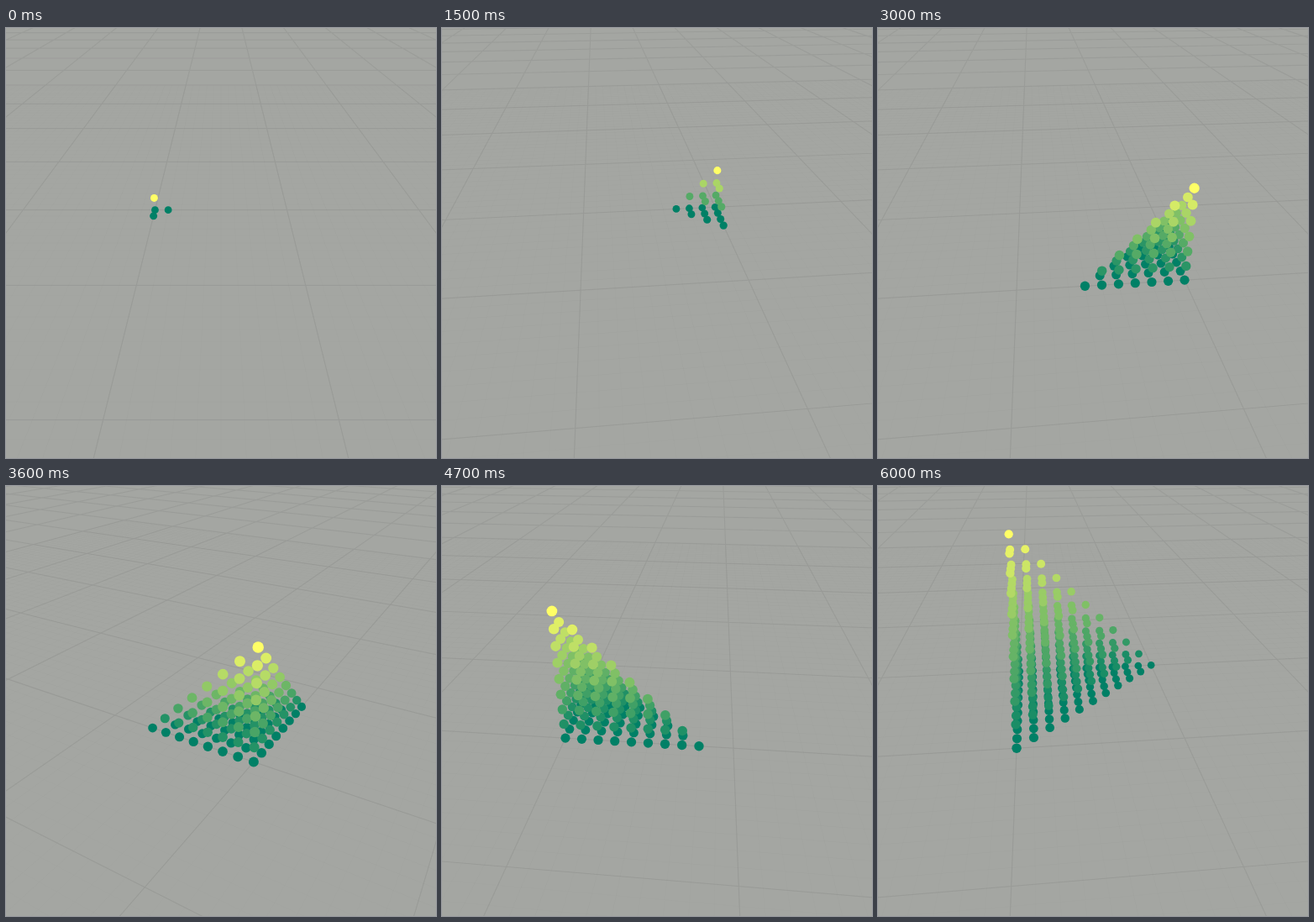
Write an HTML page with a canvas that moves like this. It is 512 px wide and 512 px high and loops after 6.1 s.

```html
<!DOCTYPE html>
<html lang="en">
<head>
<meta charset="utf-8">
<title>Tetrahedral numbers</title>
<style>
html, body { margin: 0; width: 100%; height: 100%; overflow: hidden; background: #a4a6a2; }
canvas { display: block; width: 512px; height: 512px; }
</style>
</head>
<body>
<canvas id="stage" width="512" height="512"></canvas>
<script>
const ctx = document.getElementById("stage").getContext("2d");
const CENTER = 256;
const FOCAL = CENTER / Math.tan(Math.PI / 8);
const DISTANCE = 35;
const SIN_TILT = 0.5, COS_TILT = Math.sqrt(3) / 2;
const DOT_RADIUS = 0.28;
const NEAR = 2;
const LOOP = 6100, STEP = 100, STEPS = 60;

// World to camera: x right, y up, w depth. The camera orbits the origin.
function toCamera(x, y, z, angle) {
  const c = Math.cos(angle), s = Math.sin(angle);
  const away = y * c - x * s;
  return {
    x: x * c + y * s,
    y: away * SIN_TILT + z * COS_TILT,
    w: DISTANCE + away * COS_TILT - z * SIN_TILT
  };
}

function toScreen(p) {
  const scale = FOCAL / p.w;
  return [CENTER + p.x * scale, CENTER - p.y * scale];
}

function clipNear(p, q) {
  if (p.w >= NEAR) return p;
  const t = (NEAR - p.w) / (q.w - p.w);
  return { x: p.x + (q.x - p.x) * t, y: p.y + (q.y - p.y) * t, w: NEAR };
}

function addLine(a, b) {
  if (a.w < NEAR && b.w < NEAR) return;
  ctx.moveTo(...toScreen(clipNear(a, b)));
  ctx.lineTo(...toScreen(clipNear(b, a)));
}

function drawGrid(extent, spacing, color, width, angle) {
  ctx.beginPath();
  for (let v = -extent; v <= extent; v += spacing) {
    addLine(toCamera(v, -extent, 0, angle), toCamera(v, extent, 0, angle));
    addLine(toCamera(-extent, v, 0, angle), toCamera(extent, v, 0, angle));
  }
  ctx.strokeStyle = color;
  ctx.lineWidth = width;
  ctx.stroke();
}

function drawTetrahedron(size, angle) {
  const dots = [];
  for (let k = 0; k < size; k++) {
    const level = k / (size - 1);
    const color = `rgb(${Math.round(255 * level)},${Math.round(128 + 127 * level)},102)`;
    for (let j = 0; j < size - k; j++) {
      for (let i = 0; i < size - k - j; i++) {
        dots.push({ ...toCamera(i - 5, 5 - j, k, angle), color });
      }
    }
  }
  dots.sort((a, b) => b.w - a.w);
  for (const dot of dots) {
    ctx.beginPath();
    ctx.arc(...toScreen(dot), DOT_RADIUS * FOCAL / dot.w, 0, Math.PI * 2);
    ctx.fillStyle = dot.color;
    ctx.fill();
  }
}

function draw(time) {
  // The first pose is held for two steps.
  const step = Math.max(0, Math.floor((time % LOOP) / STEP) - 1);
  const angle = step * 2 * Math.PI / STEPS;
  const size = Math.min(11, 2 + Math.floor((step + 1) / 6));

  ctx.fillStyle = "#a4a6a2";
  ctx.fillRect(0, 0, 512, 512);
  drawGrid(45, 1, "rgba(0,0,0,0.012)", 1, angle);
  drawGrid(125, 10, "rgba(0,0,0,0.06)", 1.2, angle);
  drawTetrahedron(size, angle);
}

let start;
function tick(now) {
  if (start === undefined) start = now;
  draw(Math.max(0, now - start));
  requestAnimationFrame(tick);
}
draw(0);
requestAnimationFrame(tick);
</script>
</body>
</html>
```
